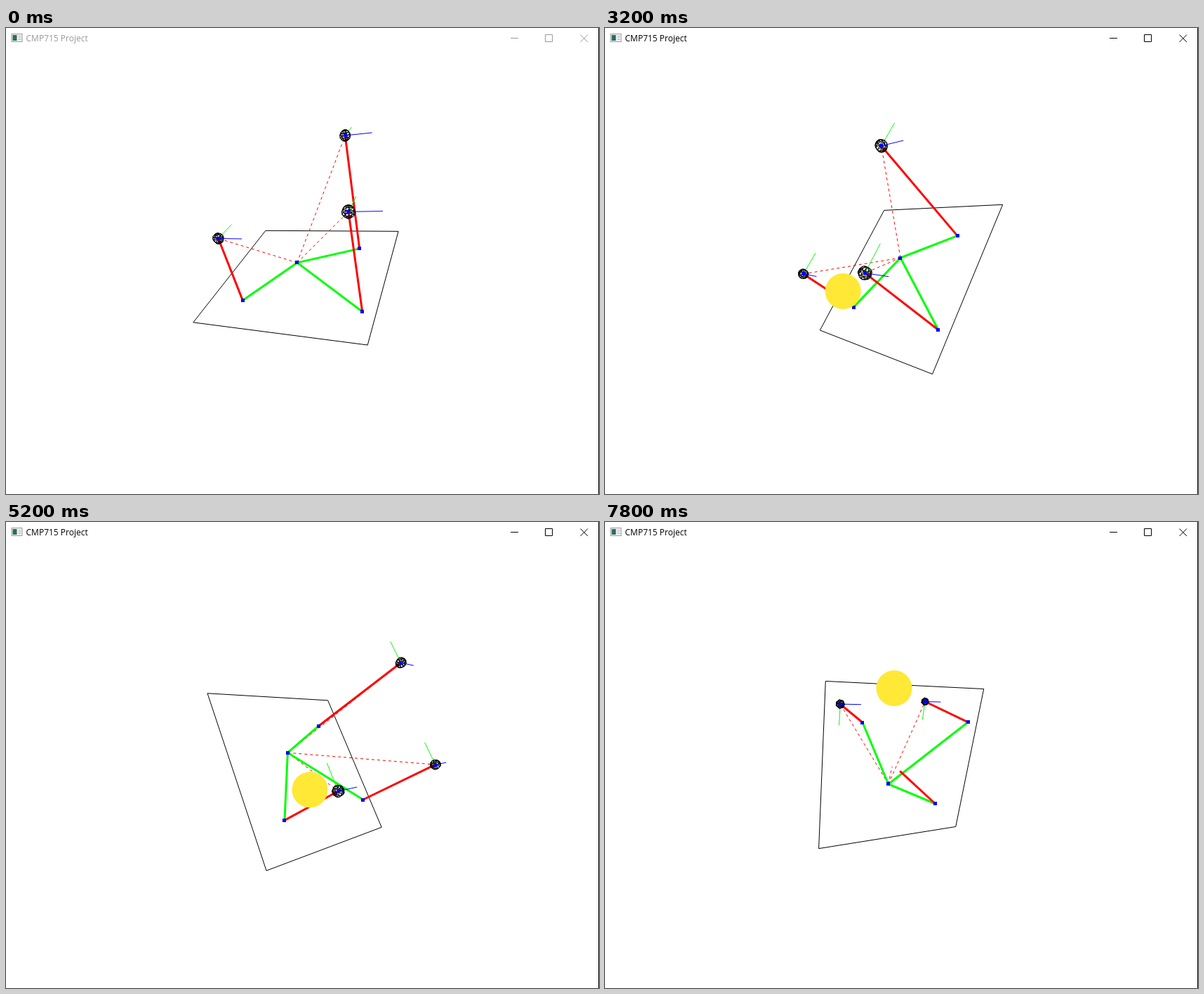
Recreate the animation shown at these times as an HTML page with a canvas. Size 845 px wide and 663 px high, loop 8000 ms.

```html
<!DOCTYPE html>
<html lang="en">
<head>
<meta charset="utf-8">
<title>CMP715 Project</title>
<style>
  html, body { margin: 0; width: 100%; height: 100%; overflow: hidden; background: #fff; }
  canvas, svg { position: absolute; left: 0; top: 0; display: block; }
  #bar { color: #999; }
  #bar.active { color: #000; }
  text { font: 12px "Open Sans", "Noto Sans", sans-serif; fill: currentColor; }
  .ctl { fill: none; stroke: currentColor; }
</style>
</head>
<body>
<canvas id="view" width="845" height="663"></canvas>
<svg id="bar" width="845" height="663" viewBox="0 0 845 663">
  <rect x="8" y="8.5" width="15" height="11" fill="#f4f4f4" stroke="#999"/>
  <rect x="9.5" y="10" width="6" height="8" fill="#2c6b62"/>
  <path d="M17.5 11.5h4M17.5 14h4M17.5 16.5h4" stroke="#b5b5b5"/>
  <text x="28.5" y="18.5">CMP715 Project</text>
  <path class="ctl" d="M719 14.5h11M768.5 9.5h10v10h-10zM818.5 9.5l10.5 10.5M829 9.5l-10.5 10.5"/>
  <path d="M844.5 0v663" stroke="#111"/>
</svg>
<script>
const ctx = document.getElementById('view').getContext('2d');
const bar = document.getElementById('bar');
const LOOP = 8000, STEP = 200, DEG = Math.PI / 180;

// time, yaw, pitch in degrees
const TURN = [
  [0, -22.8, 30.5], [2000, -22.8, 30.5], [2400, -70, 38.5], [4000, -5, 63.3],
  [5200, 44.7, 60.2], [6200, 53.6, 19.5], [7200, 36.3, -28.9], [7800, 26.5, -74.3]
];
// time, x, y of the pointer spot
const SPOT = [
  [800, 4, 401.5], [1300, 165, 360], [1800, 289, 328], [2000, 352, 350], [2400, 311.5, 357],
  [4000, 384, 385], [5200, 433, 381], [6200, 442.5, 336], [7200, 424.5, 284], [7800, 412, 236.5]
];

// monotone cubic through column k of a key table
function sample(keys, t, k) {
  const last = keys.length - 1;
  if (t <= keys[0][0]) return keys[0][k];
  if (t >= keys[last][0]) return keys[last][k];
  const i = keys.findIndex((key, n) => n < last && t < keys[n + 1][0]);
  const slope = n => (keys[n + 1][k] - keys[n][k]) / (keys[n + 1][0] - keys[n][0]);
  const tangent = n => {
    if (n === 0 || n === last) return slope(n ? n - 1 : 0);
    const a = slope(n - 1), b = slope(n);
    return a * b <= 0 ? 0 : 2 * a * b / (a + b);
  };
  const h = keys[i + 1][0] - keys[i][0], u = (t - keys[i][0]) / h, v = 1 - u;
  return keys[i][k] * v * v * (1 + 2 * u) + keys[i + 1][k] * u * u * (3 - 2 * u)
    + h * u * v * (v * tangent(i) - u * tangent(i + 1));
}

// scene: y is up, z points to the near edge
const HALF = 3.5, RADIUS = 0.2, SLICES = 7, STACKS = 7;
const HUB = [-0.59, 0, -0.745];
const LEGS = [[-2, 3, 2], [2, 5, -2], [3, 4, 2]];
const CAM = { x: 424.2, y: 349.1, scale: 33.06, dist: 15.3, far: -4.87, tilt: 7.55 * DEG };

let yaw = 0, pitch = 0;

function spin(a, b, angle) {
  const c = Math.cos(angle), s = Math.sin(angle);
  return [a * c - b * s, a * s + b * c];
}
function toView([x, y, z]) {
  [y, z] = spin(y, z, pitch);
  [z, x] = spin(z, x, yaw);
  [y, z] = spin(y, z, CAM.tilt);
  return [x, y, z];
}
function project([x, y, z]) {
  const k = CAM.scale / (1 - z / CAM.dist);
  return [CAM.x + x * k, CAM.y - y * k];
}
const cut = (p, q) => {
  const u = (CAM.far - p[2]) / (q[2] - p[2]);
  return p.map((v, i) => v + (q[i] - v) * u);
};

function addLine(from, to) {
  let p = toView(from), q = toView(to);
  const pOut = p[2] < CAM.far, qOut = q[2] < CAM.far;
  if (pOut && qOut) return;
  if (pOut) p = cut(p, q);
  else if (qOut) q = cut(p, q);
  ctx.moveTo(...project(p));
  ctx.lineTo(...project(q));
}
function lines(pairs, color, width, dash = []) {
  ctx.beginPath();
  pairs.forEach(([p, q]) => addLine(p, q));
  ctx.strokeStyle = color;
  ctx.lineWidth = width;
  ctx.setLineDash(dash);
  ctx.stroke();
}
function dot(point) {
  const v = toView(point);
  if (v[2] < CAM.far) return;
  const [x, y] = project(v);
  ctx.fillStyle = '#00f';
  ctx.fillRect(Math.round(x - 2.5), Math.round(y - 2.5), 5, 5);
}
const shift = (p, x, y, z) => [p[0] + x, p[1] + y, p[2] + z];

function wireBall(c) {
  const at = (i, j) => {
    const a = 2 * Math.PI * i / SLICES, b = Math.PI * j / STACKS, r = RADIUS * Math.sin(b);
    return shift(c, r * Math.cos(a), RADIUS * Math.cos(b), -r * Math.sin(a));
  };
  const pairs = [];
  for (let i = 0; i < SLICES; i++) {
    for (let j = 0; j < STACKS; j++) {
      pairs.push([at(i, j), at(i, j + 1)]);
      if (j) pairs.push([at(i, j), at(i + 1, j)]);
    }
  }
  lines(pairs, '#000', 1);
}

const CORNERS = [[-1, -1], [1, -1], [1, 1], [-1, 1]].map(([x, z]) => [x * HALF, 0, z * HALF]);
const EDGES = CORNERS.map((p, i) => [p, CORNERS[(i + 1) % 4]]);
const FEET = LEGS.map(([x, , z]) => [x, 0, z]);

function draw(t) {
  yaw = sample(TURN, t, 1) * DEG;
  pitch = sample(TURN, t, 2) * DEG;
  bar.classList.toggle('active', t >= 2000);
  ctx.clearRect(0, 0, 845, 663);

  lines(EDGES, '#000', 1);
  lines(LEGS.map(p => [HUB, p]), '#f00', 1, [4, 4]);
  lines(FEET.map(p => [HUB, p]), '#0f0', 3);
  lines(LEGS.map((p, i) => [FEET[i], p]), '#f00', 3);
  lines(LEGS.map(p => [p, shift(p, 0, 0, -1)]), '#0f0', 1);
  LEGS.forEach(wireBall);
  lines(LEGS.map(p => [p, shift(p, 1, 0, 0)]), '#00f', 1);
  [HUB, ...FEET, ...LEGS].forEach(dot);

  if (t >= SPOT[0][0]) {
    ctx.beginPath();
    ctx.arc(sample(SPOT, t, 1), sample(SPOT, t, 2), 25.5, 0, 2 * Math.PI);
    ctx.fillStyle = '#ffe836';
    ctx.fill();
  }
}

const start = performance.now();
let shown = -1;
function tick() {
  const t = (performance.now() - start) % LOOP;
  const step = Math.floor(t / STEP) * STEP;
  if (step !== shown) draw(shown = step);
  requestAnimationFrame(tick);
}
tick();
</script>
</body>
</html>
```
